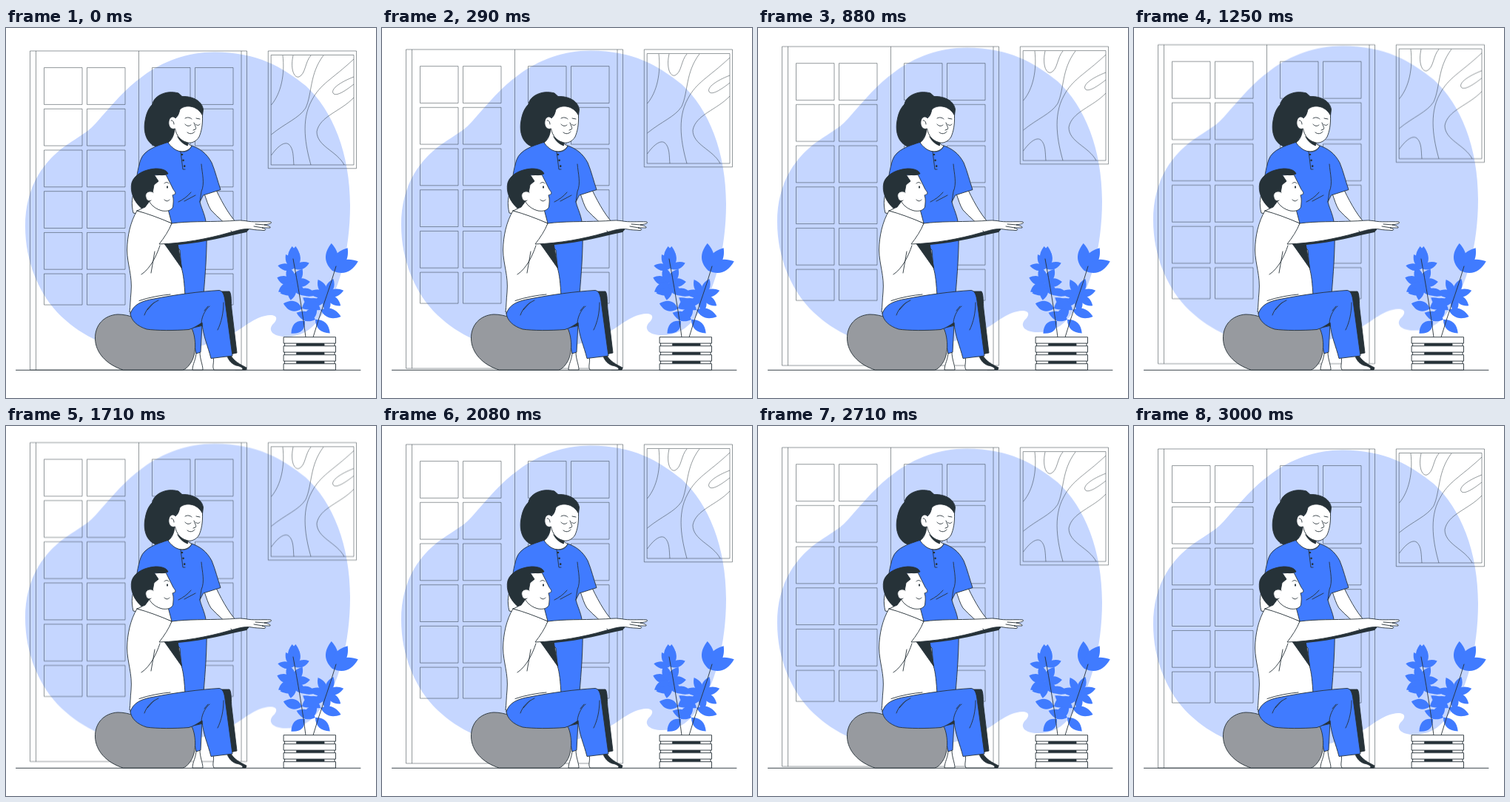
An HTML page for the animation above (3.04 s loop, 500 px wide and 500 px high).

```html
<!DOCTYPE html>
<html lang="en">
<head>
<meta charset="utf-8">
<title>Seated exercise</title>
<style>
html, body { margin: 0; width: 100%; height: 100%; overflow: hidden; background: #fff; }
svg { display: block; width: 100vw; height: 100vh; }
.float { animation: float 3040ms linear infinite; }
@keyframes float {
  0%, 98.7%, 100% { transform: translateY(0); }
  49.2% { transform: translateY(-10px); }
}
.thin { fill: none; stroke: #263238; stroke-width: .5; }
.ink { stroke: #263238; stroke-width: .9; stroke-linecap: round; stroke-linejoin: round; }
.line { fill: none; }
.white { fill: #fff; }
.blue { fill: #407bff; }
.dark { fill: #263238; }
</style>
</head>
<body>
<svg viewBox="0 0 500 500">
  <g class="float">
    <path fill="#c5d6ff" d="M26 268C26 215 50 178 88 154C105 143 112 139 122 128C145 102 160 83 185 65C212 45 245 32.500 282 32.500C340 33 372 52 405 78C442 112 465 170 465 240C465 300 450 360 424 392C412 410 395 418 375 417C361 416 354 409 360 401C367 395 368 388 357 388C338 389 325 402 308 412C270 432 220 442 180 439C140 433 105 418 75 390C44 360 26 315 26 268Z"/>
    <g class="thin">
      <path d="M32.500 462V31H325.500V462ZM40.500 31V462M179.500 31V462M318 31V462"/>
      <g id="panels"></g>
      <path d="M354.300 31H473.500V189.800H354.300ZM358.200 36.500H470V185H358.200Z"/>
      <path d="M374 37C377 62 372 88 358.500 104M388 37C384 55 389 68 396 66C405 62 404 46 412 37M429 37C410 62 414 88 405 108C396 122 378 128 358.500 144M470 42C440 70 425 75 413 98C398 125 405 160 412 185M470 66C452 73 439 82 442 88C446 94 461 83 470 76M470 94C452 113 424 119 420 140C420 160 447 166 457 185M358.500 172C367 160 376 153 382 157C389 163 388 175 389 185"/>
    </g>
  </g>

  <path class="ink line" d="M13.500 462.300H479"/>

  <g id="plant" class="blue"></g>
  <g class="ink">
    <path class="line" d="M405 418C401 385 394 345 388 312M415 418C424 386 437 354 446 322"/>
    <path class="white" d="M377 420H444V461H377Z"/>
    <g id="pot"></g>
  </g>

  <!-- standing helper -->
  <g class="ink">
    <path class="white" d="M175 217C170 226 169 238 172 250L186 252V217Z"/>
    <path class="white" d="M257 438C257 448 252 454 252 462H266C266 455 262 448 262 438Z"/>
    <path class="white" d="M268 224C271 232 273 240 277 246C286 256 297 264 305 274C309 278 314 278 318 276L314 266C304 256 294 240 284 219Z"/>
    <path class="dark" d="M198 103C199 93 215 83 233 88L238 92.500C253 92 265 99 266.500 110L265 123L238 107C235 115 232 120 228 121L229 140L221 153C216 159 211 161 206 161C190 158 185 141 188 125C190 113 194 107 198 103Z"/>
    <path class="white" d="M228 133C228 146 223 152 219 155C222 164 232 168 239 167C246 166 250 162 251 159C247 158 245 156 245 152Z"/>
    <path class="blue" d="M218.500 154.500C205 159 187 164 182 178C178 190 176 204 174 220L190 260L235 300L240 360L257 440L263 438L267 360C269 335 272 300 271 270C270 253 265 247 262 235L266.500 226L290 218.500C286 207 283 194 278 182C271 169 262 163 251 159C249 165 243 168 237 167C228 166 223 160 218.500 154.500Z"/>
    <path class="dark" d="M232 147C236 151 241 154 246 155L245.500 159C240 157 235 153 232 147Z"/>
    <path class="white" d="M235 110C242 103 258 104 265.500 118C266 131 264 140 261 147C257 154 249 157 243 154C236 152 230 145 228.500 136C223 138 219 133 220 126C221 120 226 118 229 122C233 119 234 114 235 110Z"/>
    <path class="line" d="M223 125C225 124 227 127 227 130M242 130C244 133 248 133 250 131M256 130C258 132 261 132 262 130M242 122C245 120 249 121 251 123M257 122L262 123M254 128C255 132 258 135 256 137L253 138M245 141C248 144 253 143 255 140"/>
    <path class="line" d="M236 167L239 191L242 191M264 184C265 197 269 210 264 221L262 235M233 235C239 232 245 228 250 222M241 234L256 226"/>
    <path class="line" stroke-width="2.600" stroke-dasharray="0 8" d="M238 171L241.500 188"/>
  </g>

  <!-- ball -->
  <path class="ink" fill="#979a9f" d="M158 462C136 455 121 439 120.500 420C120 401 133 388 151 387C167 387 179 394 198 398C218 402 242 398 250 404C257 416 258 440 250 452C246 458 243 461 239 462Z"/>

  <!-- seated man -->
  <g class="ink">
    <path class="dark" d="M303 441C307 450 317 455 325 459L324 462H310L294 450Z"/>
    <path class="white" d="M280 444C282 452 278 457 281 462H319C322 460 317 457 311 456C305 454 301 449 299 444Z"/>
    <path class="dark" d="M291 356L302 356C305 360 304 370 305 380L312 439L303 441Z"/>
    <path class="dark" d="M248 406L267 394L265 402Z"/>
    <path class="white" d="M193 232C190 241 184 244 177 247L224 264L219 245Z"/>
    <path class="white" d="M177 247C168 262 164 281 163.500 300C164 320 171 335 169 357C168 367 168 375 167 384L200 385L242 362C241 346 240 333 237 324L215 292L224 264C208 257 192 251 177 247Z"/>
    <path class="dark" d="M214 291L232 291L237.500 324Z"/>
    <path class="blue" d="M168 386C172 374 182 369 200 366C228 360.500 262 356 288 354.500C293 355 295 361 296 369L306 443L277 446.500C273 430 266 416 265 398C259 402 253 406 247 407.500C228 409 203 409 190 407C177 403 169 395 168 386Z"/>
    <path class="line" d="M180 368.500C193 364 210 361 222 360M187 388C190 379 197 372 206 368M191 381L200 371M264 398C265 388 270 380 275 376M268 382L273 376M294 371C294 385 291 398 286 408M183 333C195 325 203 309 208 294M196 331L201 302"/>
    <path class="dark" stroke="none" d="M215 292C251 288 285 281 318 272L329 271.500L325 276C300 281 270 290 233 293Z"/>
    <path class="white" d="M224 264C247 261 270 262 295 261C306 261 314 259 323 260.500C334 263 346 261 358 262C360 264 356 265 349 266C353 267 358 268 357 270C352 270 350 270 346 270C351 271 352 273 349 273.500C342 273 337 273 332 272C323 270 311 274 300 277C272 285 240 291 207 292C214 283 220 274 224 264Z"/>
    <path class="line" d="M337 265L350 266M335 268L347 270M304 274C306 278 310 278 313 276L318 276"/>
    <path class="white" d="M199 199L216 198C219 204 222 210 225 216C226 219 230 222 228.500 224C228 226 225 225 225 226C227 231 226 237 225.500 242C223 247 217 248 211 247C203 245 196 240 193 233Z"/>
    <path class="dark" d="M183 243.500C173 235 167 221 170 209C174 197 188 191 202 190C211 190 217 192 219 197C212 200 207 198 200 198L206 207L200 212L198 223L194 234L188 242Z"/>
    <path class="white" d="M199 222C194 219 187 222 189 229C190 233 193 235 196 233" />
    <path class="line" d="M214 210C216 208 218 208 220 210M214 232C217 235 219 234 221 232"/>
    <ellipse class="dark" stroke="none" cx="218" cy="215" rx="1" ry="1.700"/>
  </g>
</svg>
<script>
function add(parent, d, cls = "") {
  const p = document.createElementNS("http://www.w3.org/2000/svg", "path");
  p.setAttribute("d", d);
  p.setAttribute("class", cls);
  document.getElementById(parent).append(p);
}
const box = (x, y, w, h) => `M${x} ${y}h${w}v${h}h${-w}Z`;

// two door wings of two columns; the lowest row is shorter
for (const wing of [51.5, 197.5])
  for (const x of [wing, wing + 58])
    for (let row = 0; row < 6; row++)
      add("panels", box(x, 53.6 + row * 55.7, 51.5, row < 5 ? 49.8 : 42));

function leaf(x, y, angle, len, w) {
  const c = Math.cos(angle), s = Math.sin(angle);
  const at = (along, side) =>
    `${x + c * len * along - s * w * side} ${y + s * len * along + c * w * side}`;
  add("plant", `M${x} ${y}C${at(.3, .7)} ${at(.65, .7)} ${at(1, 0)}C${at(.65, -.7)} ${at(.3, -.7)} ${x} ${y}Z`);
}

// n leaves from one point, spread evenly between two angles in degrees
function fan(x, y, n, from, to, len, w) {
  for (let i = 0; i < n; i++)
    leaf(x, y, (from + (to - from) * i / (n - 1)) * Math.PI / 180, len, w);
}

// left stem, top to bottom
fan(389, 325, 4, -170, -20, 22, 9);
fan(389, 323, 2, -95, -85, 28, 13);
fan(388, 345, 7, -160, 150, 23, 11);
fan(395, 354, 2, 170, 15, 25, 10);
fan(400, 379, 2, -165, -30, 26, 13);
fan(404, 396, 2, 138, -50, 25, 13);

// right stem, top to bottom
fan(441, 328, 3, -92, -20, 37, 16);
fan(433, 361, 7, -170, 140, 24, 10);
fan(425, 381, 2, -145, 18, 29, 12);
fan(418, 394, 2, 43, 200, 27, 12);

for (let i = 0; i < 4; i++) {
  const y = 417.7 + i * 12;
  if (i) add("pot", box(393, y - 3.2, 37, 2.6), "dark");
  add("pot", box(375.5, y, 70, 8.4), "white");
}
</script>
</body>
</html>
```
